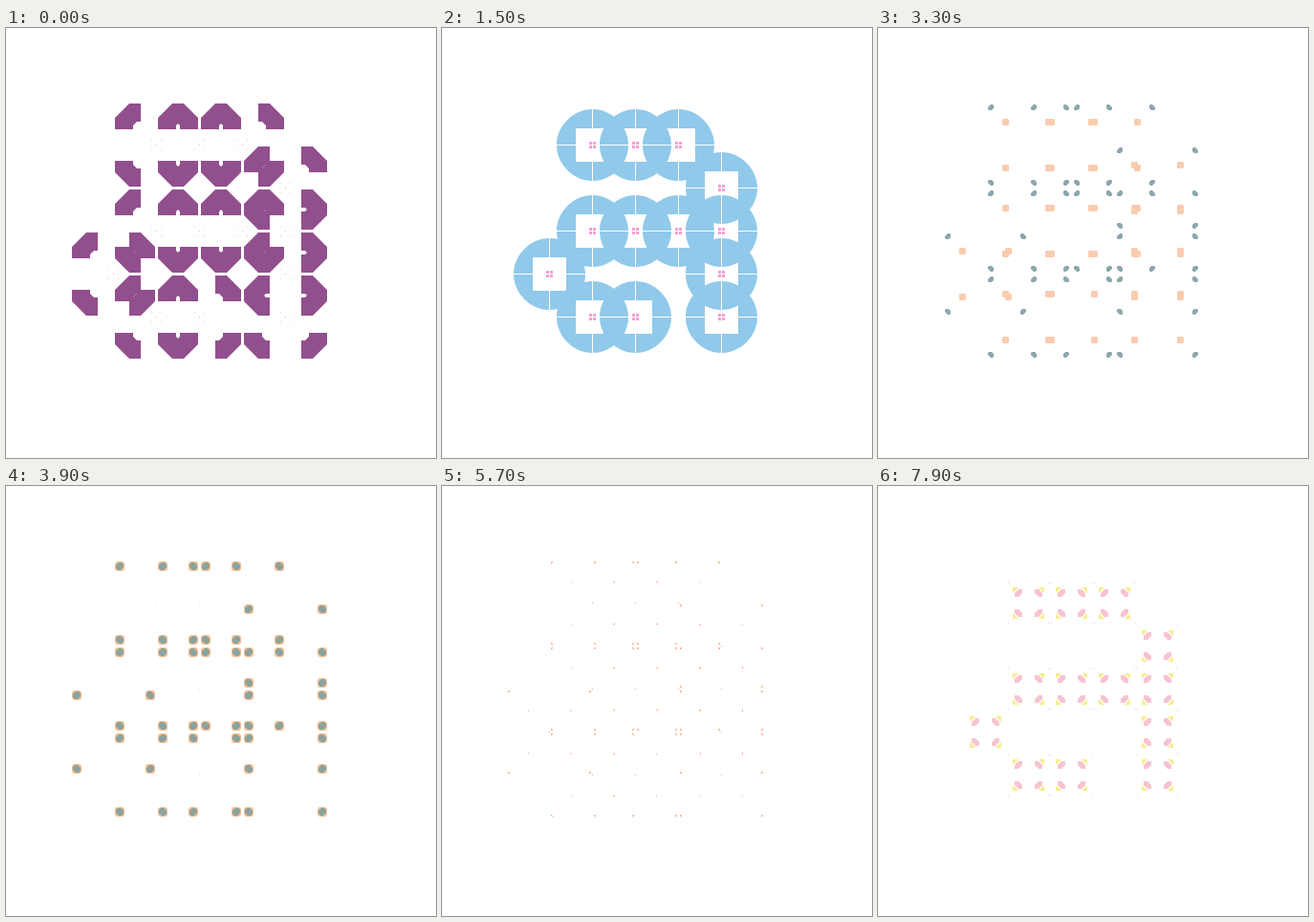
These frames come from a looping animation (450x450 px, 8 s). An HTML page with a canvas:

```html
<!DOCTYPE html>
<html>
<head>
<meta charset="utf-8">
<style>
html, body { margin: 0; width: 100%; height: 100%; overflow: hidden; background: #fff; }
canvas { display: block; }
</style>
</head>
<body>
<canvas id="stage" width="450" height="450"></canvas>
<script>
const ctx = document.getElementById('stage').getContext('2d');
const LOOP = 8000, STEP = 100, CELL = 45;

// Occupied cells, one string per row
const rows = [' ### ', '    #', ' ####', '#   #', ' ## #'];
const tiles = rows.flatMap((row, y) => [...row].flatMap((cell, x) =>
  cell === '#' ? [[112.5 + x * CELL, 122.5 + y * CELL]] : []));

// Layer: colour, outer edge, inner edge, outer corner cut, notch,
// notch bevel, side corner cut, roundness of the outer corner
const poses = [
  [0, ['#ffb4c8c0', 5.5, 4.5], ['#ff8ca8c0', .5, -.5], ['#924f8eff', 43.5, 16.5, 15, 8, 4]],
  [1500, ['#f79fd3ff', 3.5, .5], ['#f79fd300', .5, -.5], ['#90c9eaff', 37.5, .5, 37, 17, 0, 0, .95]],
  [2500, ['#fde0daff', 5.5, 3.5], ['#fbd9d200', .5, -.5], ['#8dadc0ff', 43.5, 39.5, 3]],
  [3900, ['#f7bd8eff', 43.5, 33.5, 2, 2, 2, 2], ['#e8b0b080', .5, -.5], ['#8ba39fff', 42.5, 34.5, 3, 3, 3, 2]],
  [5700, ['#ff9366c0', 22.5, 21.5], ['#c09090c0', .5, -.5], ['#ff9366e0', 43.5, 41.5, 1, 1]],
  [7000, ['#a0808050', 45.5, 44.5], ['#a0808070', .5, -.5], ['#ff9cffff', 41.5, 15.5, 2, 12]],
  [7900, ['#f8ee8eff', 16.5, 10.5, 0, 6, 6], ['#b0b0b880', 21.5, 20.5], ['#f8c3d0ff', 14.5, 6.5, 4, 4, 4]]
];

const mix = (a = 0, b = 0, p) => a + (b - a) * p;
const channels = hex => [1, 3, 5, 7].map(i => parseInt(hex.slice(i, i + 2), 16));

function blend(from, to, p) {
  const end = channels(to[0]);
  const [r, g, b, a] = channels(from[0]).map((v, i) => mix(v, end[i], p));
  const sizes = [1, 2, 3, 4, 5, 6, 7].map(i => {
    const v = mix(from[i], to[i], p);
    return i < 3 ? Math.floor(v) + .5 : i < 7 ? Math.round(v) : v;
  });
  return [`rgba(${r},${g},${b},${a / 255})`, ...sizes];
}

function outline([, o, i, c, n, r, q, k]) {
  const path = new Path2D(), m = i + n, e = o - c + c * .5523 * k;
  path.moveTo(o, i + q);
  path.lineTo(o, o - c);
  if (k) path.bezierCurveTo(o, e, e, o, o - c, o);
  else path.lineTo(o - c, o);
  for (const [x, y] of [[i + q, o], [i, o - q], [i, m], [m - r, m], [m, m - r], [m, i], [o - q, i]])
    path.lineTo(x, y);
  return path;
}

function drawLayer(layer) {
  const path = outline(layer);
  const mirrors = layer[2] < 0 ? [1] : [1, -1];
  ctx.fillStyle = layer[0];
  for (const [x, y] of tiles)
    for (const sx of mirrors)
      for (const sy of mirrors) {
        ctx.setTransform(sx, 0, 0, sy, x, y);
        ctx.fill(path);
      }
}

function draw(time) {
  const t = Math.min(Math.floor(time % LOOP / STEP) * STEP, 7900);
  let k = 0;
  while (k < poses.length - 2 && t >= poses[k + 1][0]) k++;
  const [start, ...from] = poses[k], [end, ...to] = poses[k + 1];
  const p = (t - start) / (end - start);
  ctx.resetTransform();
  ctx.clearRect(0, 0, 450, 450);
  from.forEach((layer, i) => drawLayer(blend(layer, to[i], p)));
}

const begin = performance.now();
function loop() {
  draw(performance.now() - begin);
  requestAnimationFrame(loop);
}
loop();
</script>
</body>
</html>
```
